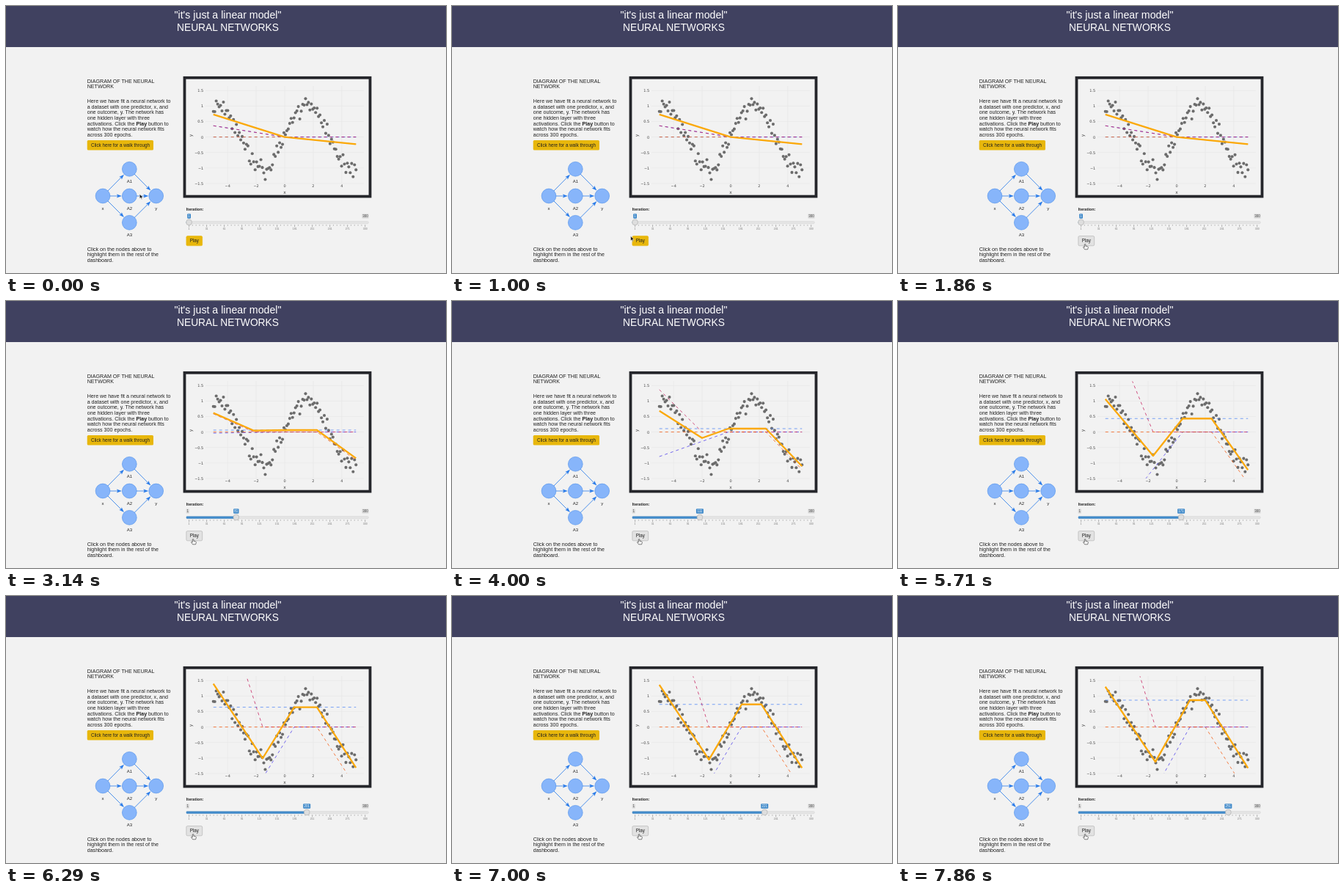
Write an HTML page that moves like this. It is 600x364 px and loops after 8000 ms.

```html
<!DOCTYPE html>
<html lang="en">
<head>
<meta charset="utf-8">
<title>Neural networks</title>
<style>
  html, body { margin: 0; width: 100%; height: 100%; overflow: hidden; background: #f2f2f2; }
  svg { display: block; width: 100vw; height: 100vh; font-family: "Liberation Sans", Arial, sans-serif; }
  .chart { font-family: "DejaVu Sans", sans-serif; }
</style>
</head>
<body>
<svg id="stage" viewBox="0 0 600 364"></svg>
<script>
const NS = "http://www.w3.org/2000/svg";
const stage = document.getElementById("stage");
const LOOP = 8000;

function el(name, attrs, parent = stage) {
  const node = document.createElementNS(NS, name);
  for (const key in attrs) node.setAttribute(key, attrs[key]);
  parent.appendChild(node);
  return node;
}
function text(x, y, size, str, attrs = {}, parent = stage) {
  const node = el("text", { x, y, "font-size": size, fill: "#222", ...attrs }, parent);
  node.textContent = str;
  return node;
}
const rect = (x, y, width, height, fill, attrs = {}, parent = stage) =>
  el("rect", { x, y, width, height, fill, ...attrs }, parent);
const line = (x1, y1, x2, y2, stroke, w, parent = stage) =>
  el("line", { x1, y1, x2, y2, stroke, "stroke-width": w }, parent);
const mid = { "text-anchor": "middle" };
const lerp = (a, b, u) => a + (b - a) * u;

// Header
rect(0, 0, 600, 56, "#404160");
text(302.5, 17.2, 14.2, "\"it's just a linear model\"", { ...mid, fill: "#fff" });
text(302.5, 34, 13.8, "NEURAL NETWORKS", { ...mid, fill: "#fff" });

// Left column
function paragraph(y, step, size, lines) {
  lines.forEach((str, i) => {
    const t = text(110.7, y + step * i, size, "");
    str.split("*").forEach((part, k) => {
      el("tspan", k % 2 ? { "font-weight": "bold" } : {}, t).textContent = part;
    });
  });
}
paragraph(105, 7.2, 7.1, ["DIAGRAM OF THE NEURAL", "NETWORK"]);
paragraph(132.2, 7.6, 7.12, [
  "Here we have fit a neural network to", "a dataset with one predictor, x, and",
  "one outcome, y. The network has", "one hidden layer with three",
  "activations. Click the *Play* button to", "watch how the neural network fits",
  "across 300 epochs."
]);
rect(110.7, 183, 90.3, 13.5, "#e8b70c", { rx: 1.6 });
text(156, 192, 6.3, "Click here for a walk through", mid);
paragraph(333.9, 7.5, 7.12, [
  "Click on the nodes above to", "highlight them in the rest of the", "dashboard."
]);

// Network diagram
const nodes = { x: [132, 259], A1: [168.3, 222.3], A2: [168.3, 259], A3: [168.3, 295.3], y: [204.7, 259] };
function arrow(from, to) {
  const [x1, y1] = nodes[from], [x2, y2] = nodes[to];
  const len = Math.hypot(x2 - x1, y2 - y1);
  const turn = Math.atan2(y2 - y1, x2 - x1) * 180 / Math.PI;
  const tip = len - 10.4;
  const g = el("g", { transform: `translate(${x1} ${y1}) rotate(${turn})` });
  line(0, 0, tip - 5, 0, "#2b7ce9", 0.8, g);
  el("path", { d: `M${tip} 0l-7 2.5l1.4-2.5l-1.4-2.5Z`, fill: "#2b7ce9" }, g);
}
for (const a of ["A1", "A2", "A3"]) { arrow("x", a); arrow(a, "y"); }
for (const name in nodes) {
  const [cx, cy] = nodes[name];
  el("circle", { cx, cy, r: 9.9, fill: "#87b5fa", stroke: "#4a8dea", "stroke-width": 0.6 });
  text(cx, cy + 19, 6, name, mid);
}

// Chart frame, grid and axes
const X0 = 380, Y0 = 178.6, XS = 19.45, YS = 42.2;
const LEFT = X0 - 5 * XS, RIGHT = X0 + 5 * XS;
rect(243.5, 97.8, 253, 161.8, "#f2f2f2", { stroke: "#25262b", "stroke-width": 3.8 });
const chart = el("g", { class: "chart" });
const label = { fill: "#444" };
const signed = v => String(v).replace("-", "−");
for (let v = -4; v <= 4; v += 2) {
  const x = X0 + v * XS;
  line(x, 109, x, 242.2, "#e9e9e9", 0.7, chart);
  text(x, 247.3, 5, signed(v), { ...mid, ...label }, chart);
}
for (let v = -1.5; v <= 1.5; v += 0.5) {
  const y = Y0 - v * YS;
  line(272, y, 488, y, "#e9e9e9", 0.7, chart);
  text(269.3, y + 1.9, 5, signed(v), { "text-anchor": "end", ...label }, chart);
}
text(X0, 256.4, 6, "x", { ...mid, ...label }, chart);
text(0, 0, 6, "y", { ...mid, ...label, transform: "translate(254.4 176.5) rotate(-90)" }, chart);

// Data: a noisy sine
let seed = 11;
function random() {
  seed = (seed * 16807) % 2147483647;
  return seed / 2147483647;
}
for (let i = 0; i < 100; i++) {
  const x = lerp(-5, 5, i / 99);
  const y = 1.07 * Math.sin(x) + 0.36 * (random() + random() - 1);
  el("circle", { cx: X0 + x * XS, cy: Y0 - y * YS, r: 2.05, fill: "#6c6c6c" }, chart);
}

// Model curves
el("rect", { x: 272, y: 109.4, width: 216, height: 132.4 }, el("clipPath", { id: "area" }));
const plot = el("g", { "clip-path": "url(#area)", fill: "none" });
const dashed = stroke => el("path", {
  stroke, "stroke-width": 0.95, "stroke-dasharray": "4 4", "stroke-opacity": 0.8
}, plot);
const bias = dashed("#4f86f5");
const unitB = dashed("#4c3cea"), unitA = dashed("#c41c5c"), unitC = dashed("#f4560a");
const fit = el("path", { stroke: "#fba90a", "stroke-width": 2.3, "stroke-linejoin": "round" }, plot);

// iteration, bias, then hinge and slope of A, B and C, in pixels
const training = [
  [1, 0, 380, -0.158, 380, -0.158, 380, 0.1],
  [81, -2.6, 338, -0.45, 385, 0.015, 424, 0.72],
  [111, -4.6, 341, -0.99, 377, 0.355, 428, 1.04],
  [151, -12.6, 346.5, -1.99, 385, 1.02, 430, 1.32],
  [201, -27, 350, -3.13, 393, 1.62, 424, 1.55],
  [251, -36.6, 351, -3.29, 398, 1.79, 419, 1.59]
];
function weights(n) {
  const i = Math.max(1, training.findIndex(row => row[0] >= n));
  const a = training[i - 1], b = training[i];
  const u = (n - a[0]) / (b[0] - a[0]);
  return a.map((v, k) => lerp(v, b[k], u));
}
function drawModel(n) {
  const [, b, hA, sA, hB, sB, hC, sC] = weights(n);
  const actA = x => sA * Math.max(0, hA - x);
  const actB = x => sB * Math.max(0, hB - x);
  const actC = x => sC * Math.max(0, x - hC);
  const trace = (node, f, hinges) => {
    const xs = [LEFT, ...hinges, RIGHT].sort((p, q) => p - q);
    node.setAttribute("d", "M" + xs.map(x => `${x} ${Y0 + f(x)}`).join("L"));
  };
  trace(bias, () => b, []);
  trace(unitA, actA, [hA]);
  trace(unitB, actB, [hB]);
  trace(unitC, actC, [hC]);
  trace(fit, x => b + actA(x) + actB(x) + actC(x), [hA, hB, hC]);
}

// Slider
const slideX = n => 249.6 + (n - 1) * 0.803;
text(245.8, 279.4, 5.5, "Iteration:", { "font-weight": "bold" });
rect(245.8, 293.5, 248.6, 3.3, "#e4e4e4", { rx: 1.5, stroke: "#cfcfcf", "stroke-width": 0.4 });
const fill = rect(245.8, 293.5, 4, 3.3, "#428bca", { rx: 1 });
for (let i = 0; i <= 50; i++) {
  const x = lerp(249.6, slideX(300), i / 50);
  line(x, 298.2, x, i % 5 ? 299.6 : 301.2, "#666", 0.5);
  if (i % 5 === 0) text(x, 304.6, 3.5, Math.min(300, 1 + i * 6), { ...mid, fill: "#777" });
}
function tag(x, color, ink, str) {
  const g = el("g", { transform: `translate(${x} 0)` });
  const w = 2 + 2.4 * str.length;
  const box = rect(-w / 2, 283.2, w, 6.6, color, { rx: 1 }, g);
  const num = text(0, 288.2, 4.5, str, { ...mid, fill: ink }, g);
  return { g, box, num };
}
const low = tag(247.8, "#dcdcdc", "#444", "1").g;
tag(490, "#dcdcdc", "#444", "300");
const value = tag(slideX(1), "#428bca", "#fff", "1");
const knob = el("circle", { cy: 294.9, r: 3.9, fill: "#dedede", stroke: "#ababab", "stroke-width": 0.6 });

// Play button and pointers
const play = rect(245.9, 313.6, 21.8, 13.2, "#e8b70c", { rx: 1.6, "stroke-width": 0.6 });
text(256.8, 322.4, 6.3, "Play", mid);
const pointer = el("path", {
  d: "M0 0V6.2L1.5 4.9L2.5 7.2L3.5 6.8L2.5 4.5H4.5Z",
  fill: "#111", stroke: "#fff", "stroke-width": 0.5, "stroke-linejoin": "round"
});
const hand = el("path", {
  d: "M-.9 .4Q0-.6 .7 .4V2.7L3.4 3.3Q4.3 3.6 4.1 4.8L3.4 7.2H-.6L-2.6 4.5Q-2.6 3.5-1.6 3.9L-.9 4.5Z",
  fill: "#fff", stroke: "#222", "stroke-width": 0.6, "stroke-linejoin": "round"
});

// A quick catch-up after the click, then one step of ten every 280 ms
function iteration(t) {
  if (t < 2000) return 1;
  const early = Math.min(8, 1 + Math.floor((t - 2000) / 140));
  const steady = Math.floor((t - 675) / 280);
  return 1 + 10 * Math.min(25, Math.max(early, steady));
}

let shown = 0;
function showIteration(n) {
  if (n === shown) return;
  shown = n;
  drawModel(n);
  const x = slideX(n), w = 2.2 + 2.6 * String(n).length;
  fill.setAttribute("width", x - 245.8);
  knob.setAttribute("cx", x);
  value.g.setAttribute("transform", `translate(${x} 0)`);
  value.num.textContent = n;
  value.box.setAttribute("x", -w / 2);
  value.box.setAttribute("width", w);
  low.style.display = n === 1 ? "none" : "";
}

function render(t) {
  showIteration(iteration(t));
  const u = Math.min(1, Math.max(0, (t - 140) / 1150));
  const e = u * u * (3 - 2 * u);
  const x = lerp(182.3, 255.2, e), y = lerp(256.4, 324.6, e);
  const over = x > 246 && y > 313.6;
  pointer.style.display = over ? "none" : "";
  hand.style.display = over ? "" : "none";
  (over ? hand : pointer).setAttribute("transform", `translate(${x} ${y})`);
  play.setAttribute("fill", over ? "#e2e2e2" : "#e8b70c");
  play.setAttribute("stroke", over ? "#adadad" : "#e8b70c");
}

const start = performance.now();
function tick() {
  render((performance.now() - start) % LOOP);
  requestAnimationFrame(tick);
}
tick();
</script>
</body>
</html>
```
